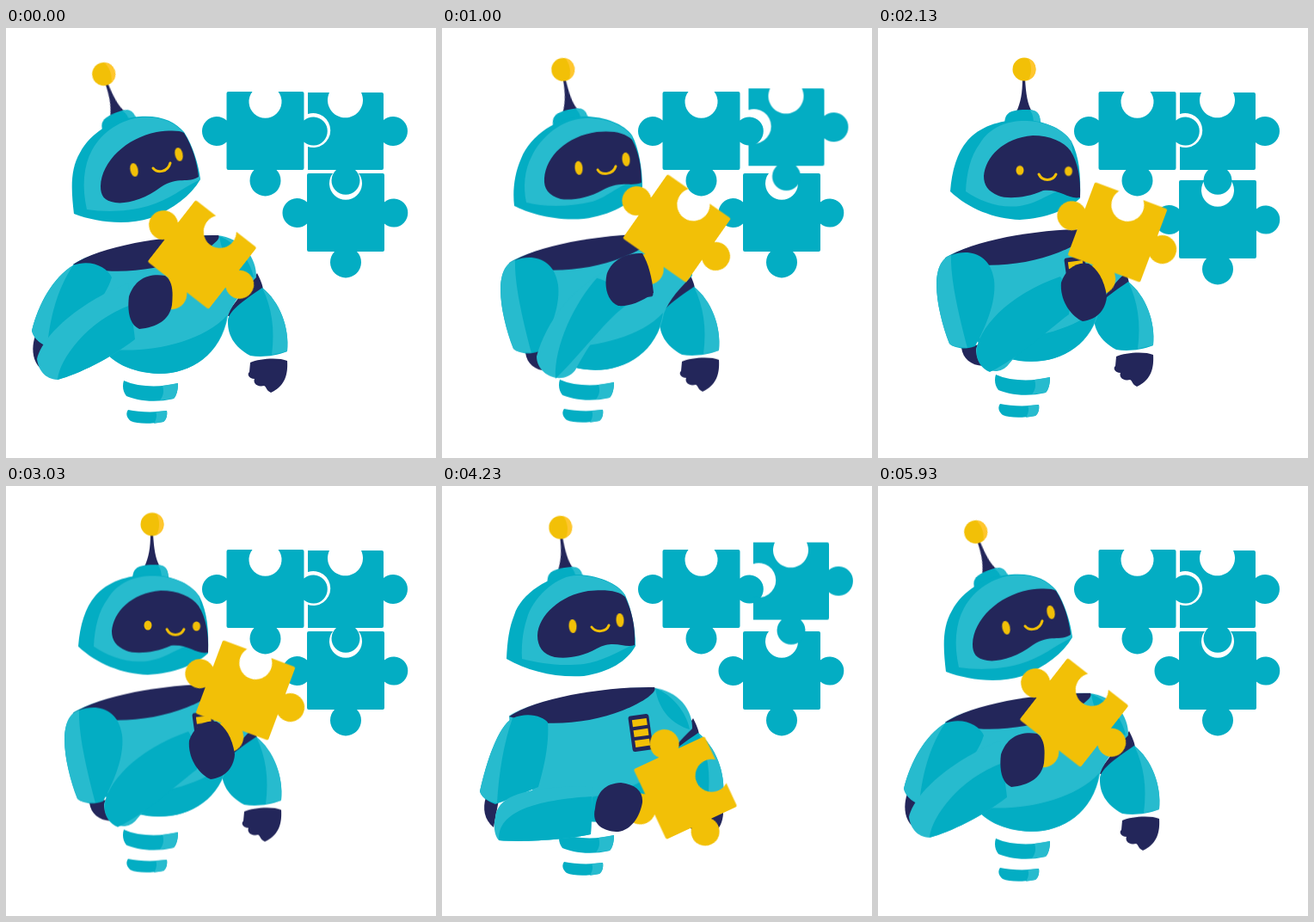
An HTML page for the animation above (6.01 s loop, 500 by 500 pixels).

```html
<!DOCTYPE html>
<html lang="en">
<head>
<meta charset="utf-8">
<title>Robot with puzzle</title>
<style>
  html, body { margin: 0; width: 100%; height: 100%; overflow: hidden; background: #fff; }
  svg { display: block; width: 100vw; height: 100vh; }

  .light { fill: #27bbce; }
  .mid { fill: #03adc3; }
  .navy { fill: #23265a; }
  .yellow { fill: #f2c007; }
  .smile { fill: none; stroke: #f2c007; stroke-width: 3; stroke-linecap: round; }

  /* Poses: --a at rest, --m reaching, --b holding up, --c holding low */
  .bob { animation: bob 6010ms linear infinite; }
  .head-d { animation: head-d 6010ms ease-in-out infinite; }
  .head-t { animation: head-t 6010ms ease-in-out infinite; }
  .arm-d { animation: arm-d 6010ms ease-in-out infinite; }
  .arm-t { animation: arm-t 6010ms ease-in-out infinite; }
  .torso { transform-origin: 0 260px; }
  .eye { rx: 4.5px; animation: blink 6010ms linear infinite; }
  .out { animation: out 3005ms ease-in-out infinite; }
  .drop { animation: drop 3005ms ease-in-out infinite; }

  @keyframes bob {
    0%, 100% { transform: translateY(0); }
    16.6% { transform: translateY(-1.2px); }
    35.4% { transform: translateY(-7px); }
    50.4% { transform: translateY(-10.5px); }
    70.4% { transform: translateY(-7px); }
    85.4% { transform: translateY(-2px); }
  }
  @keyframes head-d {
    0%, 2%, 80%, 100% { d: var(--a); }
    16.6% { d: var(--m); }
    30%, 50.6% { d: var(--b); }
    62%, 70.4% { d: var(--c); }
  }
  @keyframes head-t {
    0%, 2%, 80%, 100% { transform: var(--a); }
    16.6% { transform: var(--m); }
    30%, 50.6% { transform: var(--b); }
    62%, 70.4% { transform: var(--c); }
  }
  @keyframes arm-d {
    0%, .5%, 76%, 100% { d: var(--a); }
    8%, 16.6% { d: var(--m, var(--b)); }
    30%, 50.6% { d: var(--b); }
    55%, 70.4% { d: var(--c); }
  }
  @keyframes arm-t {
    0%, .5%, 76%, 100% { transform: var(--a); }
    8%, 16.6% { transform: var(--m, var(--b)); }
    30%, 50.6% { transform: var(--b); }
    55%, 70.4% { transform: var(--c); }
  }
  @keyframes blink {
    0%, 16.6%, 70.4%, 97%, 100% { ry: 8px; }
    35.4%, 50.4% { ry: 5.5px; }
    85.4% { ry: 5.5px; }
  }
  @keyframes out {
    0%, 25%, 58.3%, 100% { transform: translate(0, 0); }
    41.7% { transform: translate(11px, -9.5px); }
  }
  @keyframes drop {
    0%, 58.3%, 88%, 100% { transform: translate(0, 0); }
    75% { transform: translate(0, 9px); }
  }
</style>
</head>
<body>
<svg viewBox="0 0 500 500">
  <defs>
    <path id="piece" d="M-43 -45.5H-15A19 19 0 1 0 15 -45.5H43Q45 -45.5 45 -43.5V-12A16.5 16.5 0 1 1 45 13V43.5Q45 45.5 43 45.5H13A18 18 0 1 1 -13 45.5H-43Q-45 45.5 -45 43.5V13A17 17 0 1 1 -45 -12V-43.5Q-45 -45.5 -43 -45.5Z"/>
  </defs>

  <!-- Puzzle -->
  <g class="mid">
    <use href="#piece" x="301.5" y="119.5"/>
    <g class="drop"><use href="#piece" x="395" y="214.5"/></g>
    <g class="out">
      <path transform="translate(395 120)" d="M-44 -45H-19A20.5 20.5 0 1 0 18 -45H42Q44 -45 44 -43V-13A17 17 0 1 1 44 13V43Q44 45 42 45H11A16.5 16.5 0 1 1 -11 45H-44V18A20 20 0 1 0 -44 -20Z"/>
    </g>
  </g>

  <g class="bob">
    <!-- Spring -->
    <path class="mid" d="M137 410C155 418 180 418 200 413C200 422 198 428 195 431C170 437 150 432 140 428C136 423 135 416 137 410Z"/>
    <path class="light" d="M182 416L200 413C200 422 198 428 195 431L179 433C183 428 184 422 182 416Z"/>
    <path class="mid" d="M142 444C155 447 175 447 187 445C188 451 186 456 183 458C165 461 152 460 145 457C140 453 139 448 142 444Z"/>
    <path class="light" d="M174 446L187 445C188 451 186 456 183 458L172 460C175 455 176 450 174 446Z"/>

    <!-- Far arm -->
    <g class="arm-t" style="--a:translate(0,0);--m:translate(-5px,0);--b:translate(-7px,0);--c:translate(0,-8px)">
      <path class="navy" d="M284 389C295 384 318 383 327 387C328 402 325 416 308 424C302 421 303 417 300 416C291 418 287 412 289 408C282 408 280 402 283 400Z"/>
      <path class="navy" d="M256 334C268 315 283 300 292 285C296 293 299 300 299 305L262 336Z"/>
      <path class="mid" d="M258 342C257 330 275 318 298 302C318 318 330 348 327 376C312 382 296 383 284 381C264 370 258 356 258 342Z"/>
      <path class="light" d="M298 302C318 318 330 348 327 376L309 380C313 350 309 325 298 302Z"/>
    </g>

    <!-- Torso -->
    <g class="torso arm-t" style="--a:scaleY(1);--m:scaleY(.98);--b:scaleY(.95);--c:scaleY(.97)">
      <path class="light" d="M78 275C100 258 190 240 245 241C275 244 292 268 291 290C278 303 264 318 258 335C250 380 215 402 178 402C140 400 120 385 110 370C85 340 80 300 78 275Z"/>
      <path class="mid" d="M112 372C150 380 225 370 257 334C250 380 215 402 178 402C145 401 122 388 112 372Z"/>
    </g>
    <path class="mid" d="M248 242C268 250 284 270 288 290C270 285 252 270 248 242Z"/>
    <path class="navy" d="M78 275C110 253 190 240 247 241C251 246 235 258 210 268C170 284 115 288 78 275Z"/>
    <g transform="translate(231 294) rotate(-8)">
      <rect class="navy" x="-12" y="-21" width="24" height="42" rx="3"/>
      <path class="yellow" d="M-8 -16H9V-8H-8ZM-8 -4H9V4H-8ZM-8 8H9V16H-8Z"/>
    </g>

    <!-- Antenna -->
    <g class="head-t" style="--a:translate(131px,110px) rotate(-19deg);--m:translate(149px,108px) rotate(-10deg);--b:translate(168px,114px) rotate(0deg);--c:translate(143px,114px) rotate(-7deg)">
      <path class="navy" d="M0 -48H3C4 -30 6 -18 11 -10H-7C-2 -20 0 -32 0 -48Z"/>
      <circle class="yellow" cx="2" cy="-59" r="13.5"/>
      <path fill="#ffc62e" d="M7 -71.5A13.5 13.5 0 0 1 7 -46.5C11 -54 11 -64 7 -71.5Z"/>
      <path class="mid" d="M-21 7C-21 -7 -17 -11 0 -12C17 -13 21 -8 21 6Z"/>
      <path class="light" d="M8 -12C18 -11 21 -8 21 6H13C13 -2 12 -8 8 -12Z"/>
    </g>

    <!-- Head -->
    <path class="mid head-d" style="
      --a:path('M79 216C76 190 74 165 86 145C98 122 125 105 155 103C180 101 197 109 207 121C218 138 224 160 226 176C215 195 195 210 168 221C140 230 105 226 79 216Z');
      --m:path('M84 208C82 191 84 171 92 153C103 125 135 105 165 104C190 104 212 113 221 126C229 141 233 166 233 186C222 206 195 219 165 223C130 226 100 216 84 208Z');
      --b:path('M84 197C86 172 92 152 104 138C118 121 145 113 168 114C190 114 214 122 225 139C234 157 236 177 235 205C220 219 195 228 165 230C135 229 105 217 84 197Z');
      --c:path('M75 208C76 187 78 172 84 157C92 132 125 110 155 110C180 110 205 120 213 134C220 149 225 172 225 193C215 211 195 223 165 228C130 230 100 222 75 208Z')"/>
    <path class="light head-d" style="
      --a:path('M94 211C88 185 90 160 100 142C112 120 135 106 157 104C180 102 197 110 206 121L226 176C205 186 190 200 165 207C140 214 115 214 94 211Z');
      --m:path('M98 204C94 186 96 166 104 151C115 127 140 107 167 106C190 105 212 114 221 127L231 178C205 182 195 197 175 203C145 210 118 209 98 204Z');
      --b:path('M102 197C103 175 108 155 118 142C130 122 150 115 170 115C190 115 214 122 225 139L230 190C205 194 190 210 165 214C140 217 118 208 102 197Z');
      --c:path('M93 208C92 187 95 172 100 157C110 132 135 111 157 111C180 111 205 121 213 134L225 190C205 200 185 211 165 214C135 217 115 213 93 208Z')"/>
    <path class="navy head-d" style="
      --a:path('M110 184C111 155 140 128 175 121C190 119 202 119 207 122C217 138 222 155 224 173C212 181 200 172 180 185C162 199 140 205 127 203C114 201 110 195 110 184Z');
      --m:path('M119 176C121 150 145 127 180 122C199 120 213 123 221 131C229 146 232 162 232 181C220 186 208 178 186 190C170 199 150 202 138 200C124 196 118 188 119 176Z');
      --b:path('M123 179C125 157 145 135 180 132C200 132 216 139 224 150C232 163 236 180 235 204C222 207 212 194 192 196C172 205 150 206 140 202C128 197 123 190 123 179Z');
      --c:path('M111 181C112 157 138 134 170 129C192 127 206 129 213 136C221 153 225 170 224 192C212 196 200 185 180 196C162 206 145 208 131 206C117 203 111 193 111 181Z')"/>
    <g class="yellow">
      <g class="head-t" style="--a:translate(149px,165px) rotate(-12deg);--m:translate(159px,164px) rotate(-6deg);--b:translate(165px,172.5px) rotate(0deg);--c:translate(152px,170px) rotate(-4deg)"><ellipse class="eye"/></g>
      <g class="head-t" style="--a:translate(201px,147px) rotate(-12deg);--m:translate(214px,154px) rotate(-6deg);--b:translate(221.5px,173.5px) rotate(0deg);--c:translate(207px,163px) rotate(-4deg)"><ellipse class="eye"/></g>
    </g>
    <path class="smile head-d" style="
      --a:path('M171 163C176 169 188 168 191 157');
      --m:path('M181 166C185 173 199 172 202 162');
      --b:path('M187 177C191 185.5 203 185.5 207 177');
      --c:path('M174 171C179 178 191 177 194 169')"/>

    <!-- Near arm -->
    <path class="navy arm-d" style="
      --a:path('M34 358C29 372 30 392 46 400L54 362Z');
      --b:path('M97 379C99 392 108 399 122 400L118 375Z');
      --c:path('M51 369C47 382 49 395 60 404L66 372Z')"/>
    <path class="mid arm-d" style="
      --a:path('M30 352C38 320 55 290 78 276C98 268 118 278 123 290C115 315 95 335 82 345C70 355 60 362 48 370C38 366 32 360 30 352Z');
      --b:path('M83 374C68 335 58 280 85 271C105 264 130 268 135 300C138 325 125 355 113 377C105 380 97 380 95 379C90 378 86 377 83 374Z');
      --c:path('M44 362C52 327 65 287 82 277C100 269 118 275 123 282C125 307 118 337 112 357C95 364 85 369 62 377C52 373 46 369 44 362Z')"/>
    <path class="light arm-d" style="
      --a:path('M30 352C38 320 55 290 78 276C62 300 52 330 48 370C38 366 32 360 30 352Z');
      --b:path('M83 374C68 335 58 280 85 271C84 300 95 345 104 379C90 378 86 377 83 374Z');
      --c:path('M44 362C52 327 65 287 82 277C72 305 66 340 64 376C52 373 46 369 44 362Z')"/>
    <path class="light arm-d" style="
      --a:path('M36 385C45 350 100 312 142 297C146 320 148 345 150 362C120 385 85 402 60 409C45 408 38 398 36 385Z');
      --m:path('M110 383C122 341 150 306 192 283C205 291 215 306 215 323C190 341 170 371 155 399C140 418 110 405 110 383Z');
      --b:path('M114 380C125 345 165 313 212 296C222 310 225 325 222 340C195 360 170 375 152 398C140 414 113 405 114 380Z');
      --c:path('M62 392C66 362 110 357 175 356C174 375 174 395 173 412C150 417 100 422 66 419C60 412 60 400 62 392Z')"/>
    <path class="mid arm-d" style="
      --a:path('M60 409C62 385 95 340 145 322C147 340 149 352 150 362C120 385 85 402 60 409Z');
      --m:path('M132 409C130 370 155 320 180 292C195 296 214 308 215 323C190 341 170 371 132 409Z');
      --b:path('M130 407C92 390 128 325 212 296C222 310 225 325 222 340C195 360 165 390 130 407Z');
      --c:path('M66 419C64 385 110 372 174 368C174 385 174 400 173 412C150 417 100 422 66 419Z')"/>
  </g>

  <!-- Held piece and hand -->
  <g class="yellow arm-t" style="--a:translate(228px,263.5px) rotate(38deg);--m:translate(273px,233px) rotate(35deg);--b:translate(278.5px,237.5px) rotate(20.5deg);--c:translate(283px,351px) rotate(65deg)">
    <use href="#piece"/>
  </g>
  <path class="navy arm-d" style="
    --a:path('M143 312C150 292 165 285 185 288C195 295 194 310 193 322C190 340 175 348 155 350C143 345 141 328 143 312Z');
    --m:path('M192 285C198 270 212 262 233 262C240 274 244 289 246 308C230 320 215 324 205 323C192 318 188 300 192 285Z');
    --b:path('M213 296C218 281 230 271 245 274C255 280 263 292 266 312C265 327 255 339 238 341C225 336 211 317 213 296Z');
    --c:path('M178 375C180 355 190 346 208 345C225 347 234 355 233 368C230 385 220 400 205 402C190 402 173 395 178 375Z')"/>
</svg>
</body>
</html>
```
